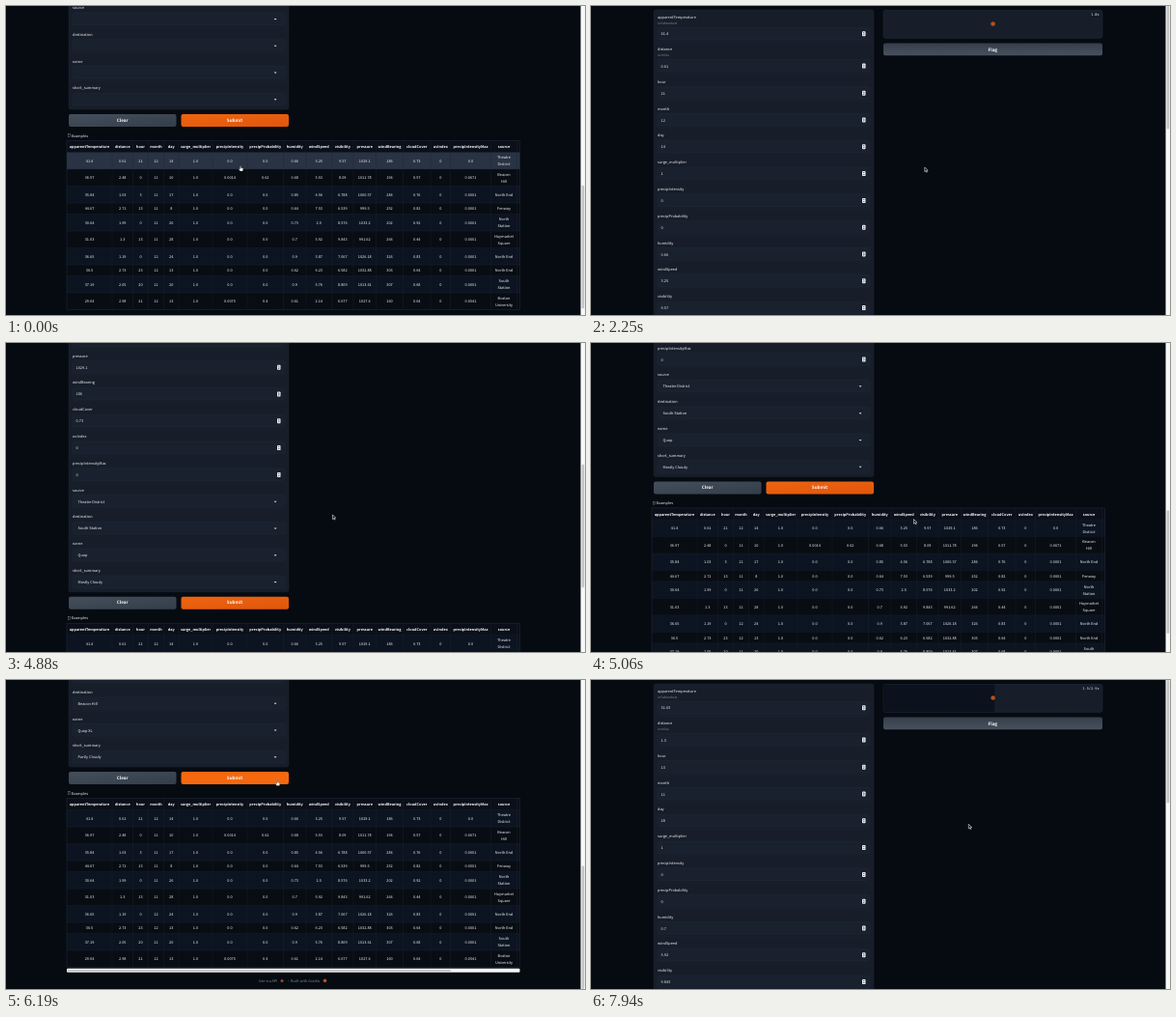
Recreate the animation shown at these times as an HTML page. Size 600 by 320 pixels, loop 8 s.

```html
<!DOCTYPE html>
<html lang="en">
<head>
<meta charset="utf-8">
<title>Ride price form</title>
<style>
html, body { margin: 0; width: 100%; height: 100%; overflow: hidden; background: #060b12; }
svg { display: block; width: 100vw; height: 100vh; }
/* text is set ten times larger and scaled down, which keeps its spacing even */
text {
  font: 500 38.8px "Noto Sans CJK SC", "Noto Sans CJK JP", "Noto Sans CJK", "Open Sans", sans-serif;
  fill: #f1f3f6; text-rendering: geometricPrecision; white-space: pre;
}
.mid { text-anchor: middle; }
.end { text-anchor: end; }
.head { font-size: 38px; font-weight: 700; fill: #fff; }
.info { font-size: 32.5px; fill: #8b93a0; }
.btn { font-size: 45.5px; font-weight: 700; fill: #fff; }
.foot { fill: #7b8390; }
.mono { font: 36px "Noto Sans Mono", "DejaVu Sans Mono", monospace; fill: #fff; }
.block { fill: #171e2a; stroke: #202937; stroke-width: .4; }
.input { fill: #19212e; stroke: #232d3b; stroke-width: .4; }
.line { stroke: #1d2531; stroke-width: .35; }
.track { fill: #f6f6f6; }
.thumb { fill: #c4c4c4; }
</style>
</head>
<body>
<svg viewBox="0 0 600 320" preserveAspectRatio="none">
  <defs>
    <linearGradient id="grey" x2="1" y2="1"><stop stop-color="#454e5b"/><stop offset="1" stop-color="#343e4b"/></linearGradient>
    <linearGradient id="flag" x2="0" y2="1"><stop stop-color="#353e4a"/><stop offset="1" stop-color="#48515d"/></linearGradient>
    <linearGradient id="orange" x2="1" y2="1"><stop stop-color="#f0640f"/><stop offset="1" stop-color="#df560d"/></linearGradient>
  </defs>
  <g id="page"></g>
  <rect class="track" x="595.5" width="4.5" height="320"/>
  <rect id="thumb" class="thumb" x="596.6" width="2.6" height="127.5" rx="1.2"/>
  <g id="cursor">
    <path id="arrow" d="M0 0V4.6L1.1 3.6 1.8 5.2 2.6 4.9 1.9 3.3H3.3Z" fill="#0a0a0a" stroke="#fff" stroke-width=".55"/>
    <path id="hand" d="M-.5 .4Q0 -.5 .5 .4V2L2.4 2.5Q3 2.7 2.8 3.7L2.3 5.6H-.4L-1.9 3.5Q-1.6 2.8 -.5 3.4Z" fill="#fff" stroke="#222" stroke-width=".35"/>
  </g>
</svg>
<script>
const LOOP = 8000, MAX = 483, TOP = 617.5;
const $ = id => document.getElementById(id);
const page = $('page');

function add(tag, attrs, parent = page) {
  const el = document.createElementNS('http://www.w3.org/2000/svg', tag);
  for (const k in attrs) el.setAttribute(k, attrs[k]);
  parent.appendChild(el);
  return el;
}
const rect = (cls, x, y, width, height, more, parent) =>
  add('rect', { class: cls, x, y, width, height, ...more }, parent);
// y is the middle of the text line
function text(str, x, y, cls = '', parent) {
  const el = add('text', { transform: `translate(${x} ${y + 1.7}) scale(.1)`, class: cls }, parent);
  el.textContent = str;
  return el;
}

const names = ('apparentTemperature distance hour month day surge_multiplier precipIntensity precipProbability ' +
  'humidity windSpeed visibility pressure windBearing cloudCover uvIndex precipIntensityMax source ' +
  'destination name short_summary').split(' ');

// Example rows: the two picked ones are given, the rest of the weather is seeded
let seed = 11;
function rand(lo, hi, digits = 0) {
  seed = seed * 16807 % 2147483647;
  return String(+(lo + (hi - lo) * seed / 2147483647).toFixed(digits));
}
const picked = {
  0: '21 12 14 1.0 0.0 0.0 0.66 3.25 9.57 1029.1 186 0.73 0 0.0',
  5: '13 11 28 1.0 0.0 0.0 0.7 5.92 9.843 991.62 264 0.44 0 0.0001'
};
const weather = wet => [
  rand(0, 23), rand(11, 12), rand(1, 29), '1.0',
  wet ? rand(.001, .009, 4) : '0.0', wet ? rand(.1, .7, 2) : '0.0',
  rand(.52, .92, 2), rand(1.8, 9, 2), rand(6.5, 9.9, 3), rand(991, 1035, 2),
  rand(139, 336), rand(.46, .97, 2), '0', wet ? rand(.01, .09, 4) : '0.0001'
];
const rows = [
  '41.4 0.61 Theatre District', '36.97 2.48 Beacon Hill', '35.84 1.03 North End', '44.67 2.71 Fenway',
  '30.64 1.99 North Station', '31.03 1.3 Haymarket Square', '36.65 1.19 North End', '36.5 2.73 North End',
  '37.19 2.05 South Station', '29.04 2.98 Boston University'
].map((row, r) => {
  const [heat, miles, ...place] = row.split(' ');
  const rest = picked[r] ? picked[r].split(' ') : weather(r % 8 === 1);
  return [heat, miles, ...rest, place.join(' ')];
});

// Form
rect('block', 65, 4, 228, 569, { rx: 2 });
const fields = names.map((name, i) => {
  const y = i < 2 ? 11 + 33.3 * i : 78 + 27.8 * (i - 2);
  const vy = y + (i < 2 ? 17.6 : 12);
  if (i) add('line', { class: 'line', x1: 65, x2: 293, y1: y - 7, y2: y - 7 });
  text(name, 69, y);
  if (i < 2) text(['in Fahrenheit', 'in miles'][i], 69, y + 6, 'info');
  rect('input', 69, vy - 6.3, 220, 12.6, { rx: 1.5 });
  if (i < 16) {
    rect('', 281, vy - 2.3, 3.5, 5, { rx: .7, fill: '#f2f3f4' });
    add('path', { d: `M281.8 ${vy - .4}h1.9l-.95 -1.1zM281.8 ${vy + .8}h1.9l-.95 1.1z`, fill: '#222' });
  } else {
    add('path', { d: `M277.7 ${vy - .3}h2.8l-1.4 1.5z`, fill: '#e9ecf0' });
  }
  return text('', i < 16 ? 72.5 : 74.5, vy);
});

function fill(values) {
  fields.forEach((f, i) => {
    const v = values[i] || '';
    f.textContent = v && i < 16 ? String(Number(v)) : v;
  });
}

rect('', 65, 578, 111.5, 13, { rx: 2, fill: 'url(#grey)' });
text('Clear', 120.7, 584, 'btn mid');
const submit = rect('', 181.5, 578, 111.5, 13, { rx: 2, fill: 'url(#orange)' });
text('Submit', 237, 584, 'btn mid');

// Output
rect('block', 303, 4.5, 227, 28.7, { rx: 2 });
text('output', 307, 11);
rect('input', 307, 16.7, 219, 12.6, { rx: 1.5 });
text('16.35', 310.5, 23);
const wait = add('g', {});
rect('block', 303, 4.5, 227, 28.7, { rx: 2 }, wait);
const bar = rect('', 303.2, 4.7, 0, 28.3, { fill: '#0b111d' }, wait);
const dot = add('circle', { cx: 416.5, cy: 18.5, r: 2.3, fill: '#b9501a' }, wait);
const timer = text('', 526.6, 8.3, 'mono end', wait);
rect('', 303, 38.5, 227, 12.8, { rx: 2, fill: 'url(#flag)' });
text('Flag', 416.3, 45, 'btn mid');

// Examples table
const widths = [47, 21.5, 16, 16, 15.5, 35, 36, 37.5, 23.5, 26.5, 22.5, 23.5, 28, 28.5, 20.5, 42, 27];
let left = 63;
const cols = widths.map(w => ({ mid: left + w / 2, right: left += w }));
rect('', 64.2, 598.8, 2.2, 2.8, { fill: 'none', stroke: '#9aa1ab', 'stroke-width': .4 });
text('Examples', 67.7, 600);
rect('', 63, 605.5, 469.5, 12, { fill: '#0a0f19' });
let y = TOP;
const bands = rows.map((row, r) => {
  const top = y, h = r % 4 === 3 ? 11.5 : 17.5, mid = top + h / 2;
  const base = r % 2 ? '#080d14' : '#0d1421';
  const el = rect('', 63, top, 469.5, h, { fill: base });
  add('line', { class: 'line', x1: 63, x2: 532.5, y1: top, y2: top });
  const place = row[16];
  const lines = place === 'North End' ? [place] : place.split(' ');
  row.slice(0, 16).forEach((v, i) => text(v, cols[i].mid, mid, 'mid'));
  lines.forEach((s, i) => text(s, cols[16].mid, mid + 7 * (i - (lines.length - 1) / 2), 'mid'));
  y += h;
  return { el, base, top, bottom: y };
});
cols.forEach((c, i) => {
  text(names[i], c.mid, 611.7, 'head mid');
  add('line', { class: 'line', x1: c.right, x2: c.right, y1: 605.5, y2: y });
});
rect('', 63, 605.5, 469.5, y - 605.5, { fill: 'none', stroke: '#242d3a', 'stroke-width': .5 });
const hbar = add('g', {});
rect('track', 63, 781.8, 469.5, 4, { rx: 1 }, hbar);
rect('thumb', 63.5, 783, 397.5, 1.8, { rx: .9 }, hbar);

text('Use via API', 261.7, 794, 'foot');
add('circle', { cx: 286, cy: 794.4, r: 1.5, fill: '#a8452f' });
text('·', 291, 794, 'foot');
text('Built with Gradio', 295, 794, 'foot');
add('circle', { cx: 330.5, cy: 794.4, r: 1.8, fill: '#b9501a' });

// Motion
const ramp = (t, from, to) => Math.min(1, Math.max(0, (t - from) / (to - from)));
const out = p => 1 - (1 - p) ** 2;
const smooth = p => p * p * (3 - 2 * p);

const scrollAt = t => 466 + 17 * out(ramp(t, 380, 620)) + MAX * (
  out(ramp(t, 4610, 5270)) - smooth(ramp(t, 1280, 1630)) - smooth(ramp(t, 6540, 6960)));

// time, x, y of each place where the pointer rests or turns
const stops = [
  [0, 243, 165.5], [780, 240, 102.5], [1260, 240, 102.5], [1650, 346.5, 171], [2250, 345.8, 167],
  [3000, 345, 170.2], [4630, 345, 170.2], [5060, 334.5, 182.5], [5310, 337.5, 194], [5620, 321, 224],
  [6170, 281, 104], [6500, 281, 104], [7020, 375, 148], [7800, 391.3, 149.3]
];
function pointerAt(t) {
  const i = stops.findIndex(s => s[0] > t);
  const b = stops[i < 0 ? stops.length - 1 : i];
  const a = i < 0 ? b : stops[i - 1];
  const p = a === b ? 0 : smooth(ramp(t, a[0], b[0]));
  return [1, 2].map(k => a[k] + (b[k] - a[k]) * p);
}

const first = [...rows[0], 'South Station', 'Quop', 'Mostly Cloudy'];
const second = [...rows[5], 'Beacon Hill', 'Quop XL', 'Partly Cloudy'];
const PICK1 = 150, SEND1 = 1230, DONE = 4175, PICK2 = 5620, SEND2 = 6470;
let shown = null;

function draw(t) {
  const scroll = scrollAt(t);
  const [x, cy] = pointerAt(t);
  page.setAttribute('transform', `translate(0 ${-scroll})`);
  $('thumb').setAttribute('y', scroll / MAX * 192.5);
  $('cursor').setAttribute('transform', `translate(${x} ${cy})`);
  hbar.style.display = t < 380 ? 'none' : '';

  const py = cy + scroll;
  const still = Math.abs(scroll - scrollAt(Math.max(0, t - 40))) < .5;
  const onTable = x > 63 && x < 532;
  let link = false;
  for (const b of bands) {
    const over = onTable && py >= b.top && py < b.bottom;
    link = link || over;
    b.el.setAttribute('fill', over && still ? '#293344' : b.base);
  }
  const onSubmit = x > 181 && x < 293 && py > 577 && py < 591;
  submit.setAttribute('fill', onSubmit ? '#f56810' : 'url(#orange)');
  $('hand').style.display = link || onSubmit ? '' : 'none';
  $('arrow').style.display = link || onSubmit ? 'none' : '';

  const values = t < PICK1 ? [] : t < PICK2 ? first : second;
  if (values[17] !== shown) { fill(values); shown = values[17]; }

  const again = t >= SEND2;
  const secs = Math.max(0, t - (again ? SEND2 : SEND1)) / 1000;
  wait.setAttribute('opacity', again ? 1 : 1 - ramp(t, DONE, DONE + 130));
  if (again || t < DONE) timer.textContent = secs.toFixed(1) + (again ? '/2.9s' : 's');
  bar.setAttribute('width', again ? 226.6 * ramp(secs, 0, 2.9) : 0);
  dot.setAttribute('cx', 416.5 + .6 * Math.sin(secs * Math.PI * 2));
}

const start = performance.now();
function tick() {
  draw((performance.now() - start) % LOOP);
  requestAnimationFrame(tick);
}
tick();
</script>
</body>
</html>
```
